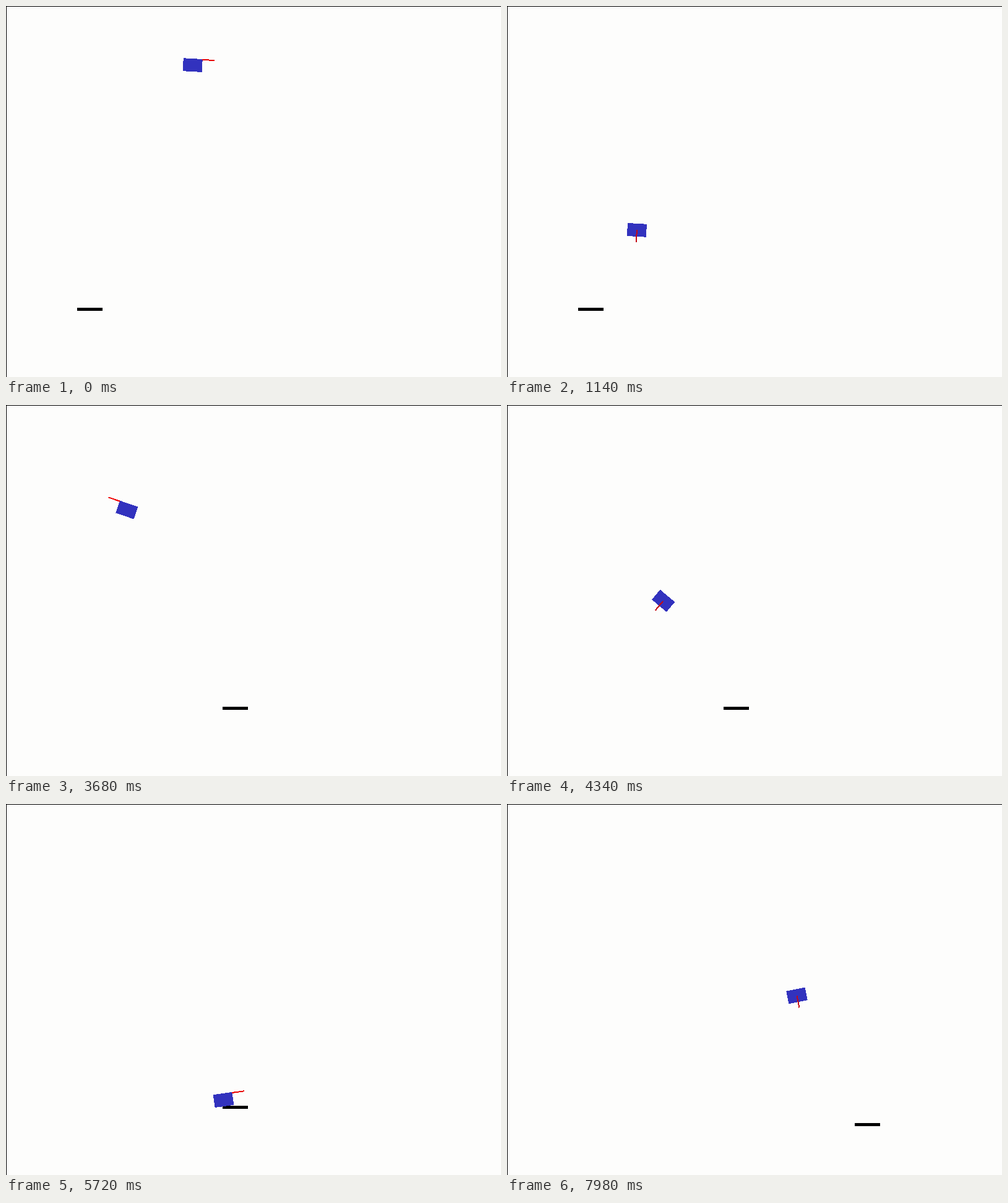
An HTML page that plays this animation: 800 by 600 pixels, repeating every 8000 ms.

```html
<!DOCTYPE html>
<html lang="en">
<head>
<meta charset="utf-8">
<title>Lander</title>
<style>
  html, body { margin: 0; width: 100%; height: 100%; overflow: hidden; background: #fdfdfc; }
  svg { display: block; width: 800px; height: 600px; shape-rendering: crispEdges; }
</style>
</head>
<body>
<svg viewBox="0 0 800 600">
  <path d="M0 .5H800M.5 0V600" stroke="#000"/>
  <rect id="pad" width="41" height="5"/>
  <g id="lander">
    <rect x="-15.5" y="-10.5" width="31" height="21" fill="#3232be"/>
    <path id="flame" stroke-width="2"/>
  </g>
</svg>
<script>
const LOOP = 8000, STEP = 20;
const GRAVITY = 327e-6, TOUCH_SPEED = 0.05; // px per ms², px per ms
const FLAMES = {
  left: { d: "M-15 -9.5h-20", color: "#f00000" },
  right: { d: "M15 -9.5h20", color: "#e80000" },
  main: { d: "M0 0v20", color: "#c40a14" }
};

// Free fall from start to brake, then a powered descent until touch.
// The sideways drift ends at settle; tilt is given at start, brake and touch.
const flights = [
  { start: -185, brake: 960, settle: 2155, touch: 2320, pad: [115, 488],
    from: [304.5, 90], to: [146.5, 478], tilt: [3, 3.8, 0], last: "main" },
  { start: 3300, brake: 4200, settle: 5660, touch: 5660, pad: [350, 488],
    from: [183.6, 146], to: [351.5, 478.5], tilt: [0, 45, -8], last: "right" },
  { start: 6620, brake: 7360, settle: 9002, touch: 9700, pad: [562, 516],
    from: [294, 88.5], to: [582, 506], tilt: [2, -2, -37], last: "main" }
];

const pad = document.getElementById("pad");
const lander = document.getElementById("lander");
const flame = document.getElementById("flame");

const mix = (a, b, u) => a + (b - a) * u;
const smooth = u => u * u * (3 - 2 * u);
const progress = (t, a, b) => Math.min(1, Math.max(0, (t - a) / (b - a)));

function heightAt({ start, brake, touch, from, to }, t) {
  const fall = Math.min(t, brake) - start;
  const y = from[1] + GRAVITY * fall * fall / 2;
  const u = progress(t, brake, touch), speed = GRAVITY * fall;
  return mix(y, to[1], smooth(u))
    + (touch - brake) * u * (1 - u) * (speed * (1 - u) - TOUCH_SPEED * u);
}

function tiltAt({ start, brake, touch, tilt }, t) {
  return t < brake
    ? mix(tilt[0], tilt[1], progress(t, start, brake))
    : mix(tilt[1], tilt[2], progress(t, brake, touch));
}

function flameAt({ brake, touch, from, to, last }, t) {
  if (t < brake) return to[0] > from[0] ? "left" : "right";
  return progress(t, brake, touch) < 0.87 ? "main" : last;
}

function draw(t) {
  const flight = flights.filter(f => f.start <= t).pop();
  const x = mix(flight.from[0], flight.to[0], smooth(progress(t, flight.start, flight.settle)));
  const { d, color } = FLAMES[flameAt(flight, t)];
  pad.setAttribute("x", flight.pad[0]);
  pad.setAttribute("y", flight.pad[1]);
  lander.setAttribute("transform",
    `translate(${x} ${heightAt(flight, t)}) rotate(${tiltAt(flight, t)})`);
  flame.setAttribute("d", d);
  flame.setAttribute("stroke", color);
}

const begin = performance.now();
function tick() {
  const t = (performance.now() - begin) % LOOP;
  draw(Math.floor(t / STEP) * STEP);
  requestAnimationFrame(tick);
}
tick();
</script>
</body>
</html>
```
